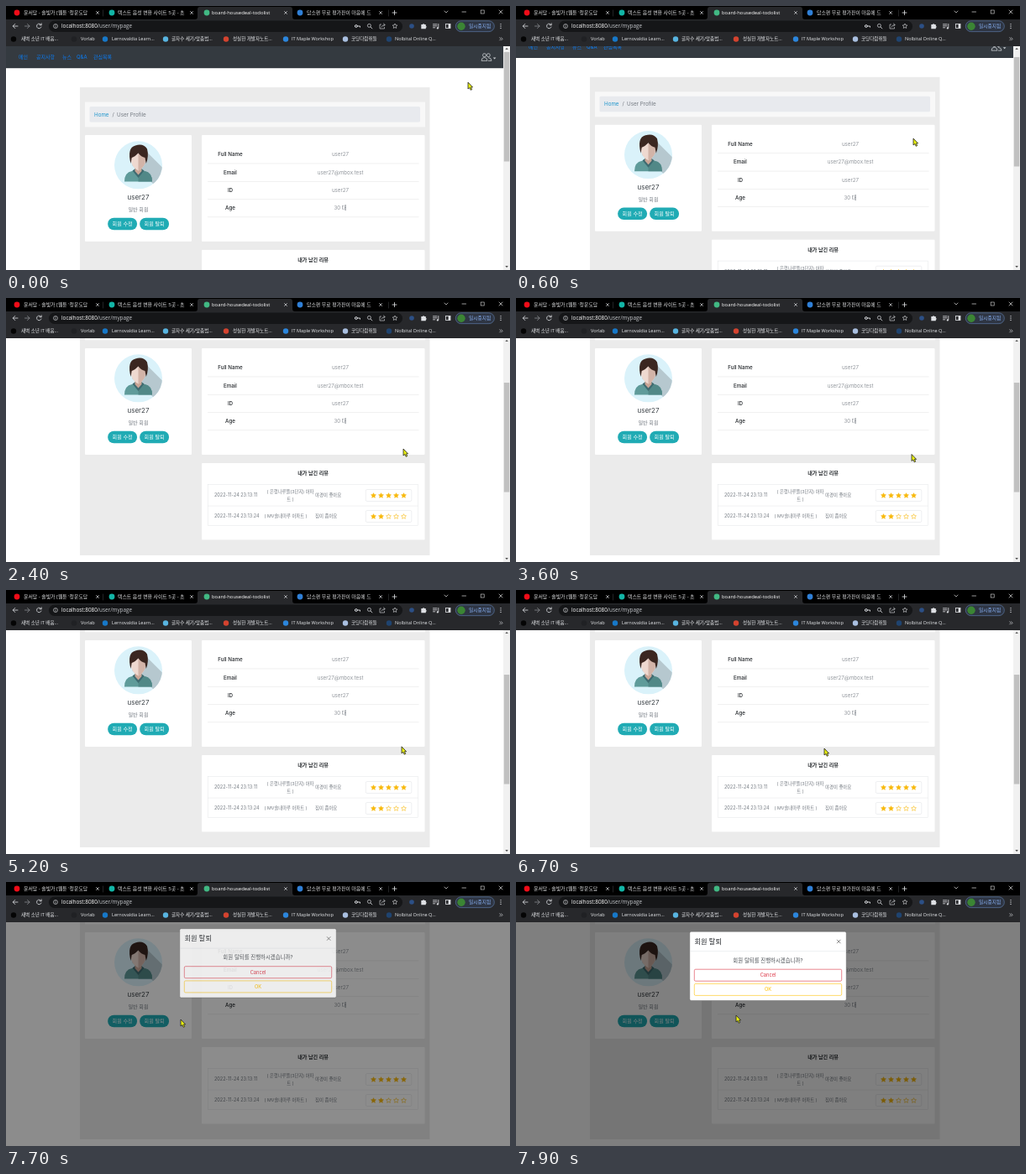
An HTML page that plays this animation: 600 px wide and 315 px high, repeating every 8 s.

```html
<!DOCTYPE html>
<html lang="ko">
<head>
<meta charset="utf-8">
<title>User Profile</title>
<style>
  html, body { margin: 0; width: 100%; height: 100%; overflow: hidden; background: #fff; }
  svg { display: block; width: 600px; height: 315px; }
  text { font-family: Inter, "Noto Sans CJK KR", "Noto Sans CJK JP", sans-serif; white-space: pre; }
  .ui text { font-family: "Open Sans", "Noto Sans CJK KR", "Noto Sans CJK JP", sans-serif; }
</style>
</head>
<body>
<svg id="stage" viewBox="0 0 600 315" xmlns="http://www.w3.org/2000/svg"></svg>
<script>
const LOOP = 8000, STEP = 100, TOP = 48;

// Shape helpers; text is placed by the middle of its line.
const rect = (x, y, w, h, fill, extra = '') =>
  `<rect x="${x}" y="${y}" width="${w}" height="${h}" fill="${fill}" ${extra}/>`;
const dot = (x, y, r, fill, extra = '') => `<circle cx="${x}" cy="${y}" r="${r}" fill="${fill}" ${extra}/>`;
const path = (d, fill, extra = '') => `<path d="${d}" fill="${fill}" ${extra}/>`;
const line = (d, stroke, w = .8) =>
  `<path d="${d}" fill="none" stroke="${stroke}" stroke-width="${w}" stroke-linecap="round" stroke-linejoin="round"/>`;
const text = (s, x, y, size, fill, extra = '') =>
  `<text x="${x}" y="${y + size * .36}" font-size="${size}" fill="${fill}" ${extra}>${s.replace('&', '&amp;')}</text>`;
const mid = (s, x, y, size, fill, extra = '') => text(s, x, y, size, fill, 'text-anchor="middle" ' + extra);
const cross = (x, y, r, c, w) => line(`M${x - r} ${y - r}l${2 * r} ${2 * r}m0 ${-2 * r}l${-2 * r} ${2 * r}`, c, w);

function star(x, y, r, filled, color = '#f8b90c') {
  let d = '';
  for (let i = 0; i < 10; i++) {
    const a = -Math.PI / 2 + i * Math.PI / 5, q = i % 2 ? r * .48 : r;
    d += (i ? 'L' : 'M') + (x + q * Math.cos(a)).toFixed(2) + ' ' + (y + q * Math.sin(a)).toFixed(2);
  }
  return path(d + 'Z', filled ? color : 'none', `stroke="${color}" stroke-width=".6" stroke-linejoin="round"`);
}

function tabs() {
  const list = [
    [13, '#f00c18', 21, "윤서담 - 솔빛가 [웹툰 '청운도담", 109],
    [126, '#12b5a6', 133, '텍스트 음성 변환 사이트 5곳 - 초', 221],
    [239, '#41b883', 245, 'board-housedeal-todolist', 333],
    [350, '#2f7fd6', 358, '담소편 무료 평가판이 마음에 드', 446]
  ];
  return rect(0, 0, 600, 17, '#000') +
    path('M225 16Q228 16 228 13V4Q228 1 231 1H338Q341 1 341 4V13Q341 16 344 16Z', '#27282b') +
    list.map(([ix, c, x, s, cx], i) =>
      dot(ix, 8, 3.4, c) +
      `<clipPath id="tab${i}"><rect x="${x}" y="0" width="${cx - x - 6}" height="16"/></clipPath>` +
      text(s, x, 8, 5.9, i === 2 ? '#fff' : '#e2e3e5', `clip-path="url(#tab${i})"`) +
      cross(cx, 8, 1.5, '#dcdde0', .7)).join('') +
    line('M115.500 5V12', '#45464a', .5) + line('M455.500 5V12', '#45464a', .5) +
    line('M460 8h5m-2.500 -2.500v5', '#e8eaed', .8) +
    line('M522 6l2 2l2 -2', '#ddd', .7) + line('M543 7h4.500', '#ddd', .7) +
    rect(565.2, 5, 4, 4, 'none', 'stroke="#ddd" stroke-width=".6"') + cross(589, 7, 2, '#ddd', .7);
}

function toolbar() {
  const c = '#dfe1e5';
  return rect(0, 16, 600, TOP - 16, '#27282b') +
    line('M14 24H8.300m2.500 -2.600l-2.600 2.600l2.600 2.600', c) +
    line('M22.500 24h5.500m-2.500 -2.600l2.600 2.600l-2.600 2.600', '#8a8c90') +
    line('M41.800 22.500A2.800 2.800 0 1 0 42 25M42.200 20.800V22.800H40', c) +
    rect(51, 17.5, 421, 13.5, '#151618', 'rx="6.700"') +
    dot(59, 24, 2.5, 'none', `stroke="${c}" stroke-width=".6"`) + line('M59 23.800V25.300M59 22.600v.01', c, .6) +
    text('localhost:8080<tspan fill="#c4c7cb">/user/mypage</tspan>', 66, 24, 6.35, '#fff') +
    dot(416.8, 24, 1.4, 'none', `stroke="${c}"`) + line('M418.300 24h3.200v1.200', c, .9) +
    dot(432.4, 23.4, 2, 'none', `stroke="${c}" stroke-width=".7"`) + line('M434 25l1.900 1.900', c) +
    line('M446.500 22H445V27H450.500V25.500M447 25Q447.500 22.500 451 22.500M449.500 21l1.700 1.500l-1.700 1.500', c, .6) +
    star(463, 24, 3, false, c) + dot(483, 24, 2.8, '#2c4f86') +
    path('M494.300 22h1.600a1.200 1.200 0 0 1 2.300 0H499.800v1.700a1.200 1.200 0 0 1 0 2.300V27.300H494.300Z', c) +
    line('M508.500 21.800h4.500m-4.500 2h4.500m-4.500 2h2.300M514.800 21.500v4.700', c) + dot(513.8, 26.4, 1.1, c) +
    rect(523.5, 21.5, 5.5, 5, 'none', `stroke="${c}" stroke-width=".8"`) + rect(526.6, 21.5, 2.4, 5, c) +
    rect(535.3, 17.8, 46, 12.8, '#2e3543', 'rx="6.400" stroke="#6485b8" stroke-width=".6"') +
    dot(542, 24.2, 4.7, '#3b8534') + text('일시중지됨', 551, 24.2, 5.7, '#8ab4f8') +
    [21.6, 24, 26.4].map(y => dot(589, y, .65, c)).join('');
}

function bookmarks() {
  const list = [
    [9, '#050505', 18, '새벽 소년 IT 배움...'], [81, '#202124', 89, 'Vorlab'],
    [118, '#1778c8', 126, 'Lernovaldia Learn...'], [190, '#58b4e0', 197, '글자수 세기/맞춤법...'],
    [262, '#d4432f', 270, '성실한 개발자노트...'], [333, '#2c86dc', 340, 'IT Maple Workshop'],
    [404, '#a9bfe0', 411, '코딩다람쥐들'], [456, '#1f4470', 463, 'Nolbital Online Q...']
  ];
  return list.map(([ix, c, x, s]) => dot(ix, 39.5, 3.2, c) + text(s, x, 39.3, 5.55, '#e8eaed')).join('') +
    line('M587.700 37.700l1.500 1.600l-1.500 1.600m2 -3.200l1.500 1.600l-1.500 1.600', '#dfe1e5', .6);
}

function avatar() {
  return `<clipPath id="face"><circle cx="157.500" cy="189.800" r="28.500"/></clipPath><g clip-path="url(#face)">` +
    rect(128, 160, 60, 60, '#daf2fa') +
    path('M164 170.500L192 198.500V225H188L172 209L150 190Z', '#b6c8cf') +
    path('M141 209.500Q141 198.500 150 197L157.500 195.500L165 197Q174 198.500 174 209.500Z', '#5f9b9a') +
    path('M157.500 195.500L165 197Q174 198.500 174 209.500H157.500Z', '#518887') +
    path('M150.500 196.500L157.500 205L164.500 196.500L161 194H154Z', '#3e6a70') +
    path('M153.500 189H161.500V197L157.500 201.500L153.500 197Z', '#c9a596') +
    path('M149 176H166V185Q165.500 192 157.500 196.500Q149.500 192 149 185Z', '#eed9d0') +
    path('M157.500 176H166V185Q165.500 192 157.500 196.500Z', '#d2b4a8') +
    path('M148.500 188Q143.800 169 154 166.500Q163.500 163.500 168 170.500Q170.300 179 166.800 188L165.500 181Q161 180 157.500 175.500Q153 180 149.700 181Z', '#3b2721') +
    '</g>';
}

function page() {
  const grey = '#737980', ink = '#212529', pale = '#e3e5e7';
  const nav = [['메인', 15], ['공지사항', 36], ['뉴스', 67], ['Q&A', 84], ['관심목록', 104]];
  const info = [['Full Name', 'user27'], ['Email', 'user27@mbox.test'], ['ID', 'user27'], ['Age', '30 대']];
  const reviews = [
    [329, '2022-11-24 23:13:11', ['( 은행나루뜰(3단지) 아파', '트 )'], '야경이 좋아요', 5],
    [354, '2022-11-24 23:13:24', ['( MV솔내마루 아파트 )'], '집이 좁아요', 2]
  ];
  const badge = (x, s, extra) =>
    rect(x, 252.7, 35, 14.6, '#20abb4', `rx="7.300" ${extra}`) + mid(s, x + 17.5, 260, 6.1, '#fff', 'font-weight="500"');
  return rect(0, 47, 600, 27.2, '#343a40') +
    nav.map(([s, x]) => text(s, x, 61, 6, '#0a7df5')).join('') +
    `<g fill="none" stroke="#c9cdd1" stroke-width=".8"><circle cx="569.500" cy="58.700" r="2"/>
      <circle cx="574.300" cy="58.700" r="2"/><path d="M566 65.300q0-3.800 3.500-3.800t3.500 3.800zM574 61.700q4 0 4 3.600h-4"/></g>` +
    path('M579.800 61.500h3.600l-1.800 2z', '#c9cdd1') +
    rect(88, 97, 416.5, 304, '#ebebeb') +
    rect(94, 114.5, 405, 30, '#f8f8f8') + rect(99.5, 120, 393.5, 18.5, '#e8eaee', 'rx="1.500"') +
    text('Home', 105, 129.3, 6.25, '#1d95cc') + text('/', 126.6, 129.3, 6.25, grey) +
    text('User Profile', 132, 129.3, 6.25, grey) +
    rect(94, 154, 127, 127, '#fff', 'rx="1"') + rect(233, 154, 265.5, 127, '#fff', 'rx="1"') + avatar() +
    mid('user27', 157.5, 228, 8, '#3a4046') + mid('일반 회원', 157.5, 242.7, 6.1, grey) +
    `<rect id="ring" x="157.800" y="251.300" width="37.600" height="17.400" rx="8.700" fill="#7fccd3"/>` +
    badge(121.1, '회원 수정', '') + badge(159.1, '회원 탈퇴', 'id="leave"') +
    info.map(([k, v], i) => {
      const y = 177 + i * 21.3;
      return mid(k, 267, y, 6.2, ink, 'font-weight="500"') + mid(v, 398, y, 6.25, grey, 'font-weight="300"') +
        rect(240, y + 10.7, 251.5, .5, '#e2e2e2');
    }).join('') +
    rect(233, 291, 265.5, 91.5, '#fff', 'rx="1"') +
    mid('내가 남긴 리뷰', 365.5, 303, 6.1, ink, 'font-weight="600"') +
    rect(240.2, 316.3, 250.3, 49, '#fff', `stroke="${pale}" stroke-width=".5"`) + rect(240, 341.8, 250.5, .5, pale) +
    reviews.map(([y, date, home, note, score]) =>
      text(date, 248, y + .5, 5.5, grey) +
      home.map((s, i) => mid(s, home.length > 1 ? 338.5 : 333, y + (home.length > 1 ? i * 8.3 - 3.6 : .5), 5.3, grey)).join('') +
      text(note, 368, y + .5, 5.4, grey) +
      rect(428.3, y - 6.5, 54.5, 14, '#fff', `rx="1.500" stroke="${pale}" stroke-width=".6"`) +
      [0, 1, 2, 3, 4].map(i => star(437.5 + i * 9, y + .8, 3.1, i < score)).join('')).join('');
}

function modal() {
  const button = (s, y, c) =>
    rect(212.3, y, 175.4, 14, 'none', `rx="1.500" stroke="${c}" stroke-width=".6"`) + mid(s, 300, y + 7, 5.7, c);
  return rect(206.8, 59.2, 186.4, 82.3, '#fff', 'rx="1.800" stroke="#555" stroke-width=".4"') +
    text('회원 탈퇴', 212.5, 71, 8.2, '#212529') + cross(384.2, 71, 1.9, '#777', .9) +
    rect(207, 82.3, 186, .5, '#dee2e6') +
    mid('회원 탈퇴를 진행하시겠습니까?', 300, 93.2, 6.4, '#4a4f54') +
    button('Cancel', 104.2, '#dc3545') + button('OK', 121.4, '#ffc107');
}

const stage = document.getElementById('stage');
stage.innerHTML = `
  <clipPath id="view"><rect x="0" y="${TOP}" width="600" height="${315 - TOP}"/></clipPath>
  ${rect(0, 0, 600, 315, '#fff')}
  <g clip-path="url(#view)">
    <g id="page">${page()}</g>
    <g id="bar">${rect(592, TOP, 8, 315 - TOP, '#f1f1f1')}${path('M594.300 52l1.800-2.200l1.800 2.200z', '#666')}
      ${path('M594.300 310l1.800 2.200l1.800-2.200z', '#555')}<rect id="thumb" x="592.800" y="55" width="6.500" height="130.500" fill="#c1c1c1"/></g>
    <rect id="shade" x="0" y="${TOP}" width="600" height="${315 - TOP}"/>
    <g id="modal">${modal()}</g>
  </g>
  <g class="ui">${tabs()}${toolbar()}${bookmarks()}</g>
  <g id="pointer">${path('M0 0V8L1.900 6.500L3.200 9.300L4.700 8.600L3.400 5.900H5.600Z', '#e8ee12',
    'stroke="#222" stroke-width=".8" stroke-linejoin="round"')}</g>`;

const el = id => document.getElementById(id);
const parts = Object.fromEntries(['page', 'bar', 'thumb', 'shade', 'modal', 'pointer', 'ring', 'leave'].map(k => [k, el(k)]));

// Tracks: [time, value...], linear between entries.
const scroll = [[400, 0], [500, 3], [600, 12.2], [700, 29], [800, 47], [900, 64], [1000, 78], [1100, 88], [1200, 93.6], [1300, 94]];
const pointer = [[0, 550, 91], [100, 541, 99], [200, 500, 137], [300, 473, 158], [1600, 473, 158], [2400, 473, 180],
  [2500, 473, 180], [2900, 472, 187], [3500, 472, 187], [3600, 471, 186.5], [6000, 471, 187], [6200, 452, 188],
  [6700, 367, 189], [6900, 312, 185], [7100, 232, 173], [7300, 184, 167], [7400, 181, 166], [7600, 181, 166],
  [7700, 208, 164], [7800, 248, 160], [7900, 262, 159]];
const shade = [[7500, 0], [7600, .12], [7700, .45], [7800, .5]];
const fade = [[7500, 0], [7600, .16], [7700, .85], [7800, 1]];
const drop = [[7500, -19.5], [7600, -15.3], [7700, -3.5], [7800, 0]];

function at(track, t) {
  const i = track.findIndex(k => k[0] > t);
  if (i === 0) return track[0].slice(1);
  if (i < 0) return track[track.length - 1].slice(1);
  const a = track[i - 1], b = track[i], p = (t - a[0]) / (b[0] - a[0]);
  return a.slice(1).map((v, n) => v + (b[n + 1] - v) * p);
}

function draw(now) {
  const t = Math.floor((now % LOOP) / STEP) * STEP;
  const [y] = at(scroll, t), [f] = at(fade, t), [s] = at(shade, t), [d] = at(drop, t), [px, py] = at(pointer, t);
  parts.page.setAttribute('transform', `translate(0 ${-y})`);
  parts.thumb.setAttribute('y', 55 + y * .49);
  parts.bar.setAttribute('visibility', f ? 'hidden' : 'visible');
  parts.shade.setAttribute('opacity', s);
  parts.modal.setAttribute('opacity', f);
  parts.modal.setAttribute('transform', `translate(0 ${d})`);
  parts.pointer.setAttribute('transform', `translate(${px} ${py})`);
  parts.ring.setAttribute('visibility', t >= 7500 && t < 7700 ? 'visible' : 'hidden');
  parts.leave.setAttribute('fill', t >= 7300 && t < 7700 ? '#1b9099' : '#20abb4');
}

const start = performance.now();
function tick() {
  draw(performance.now() - start);
  requestAnimationFrame(tick);
}
draw(0);
requestAnimationFrame(tick);
</script>
</body>
</html>
```
